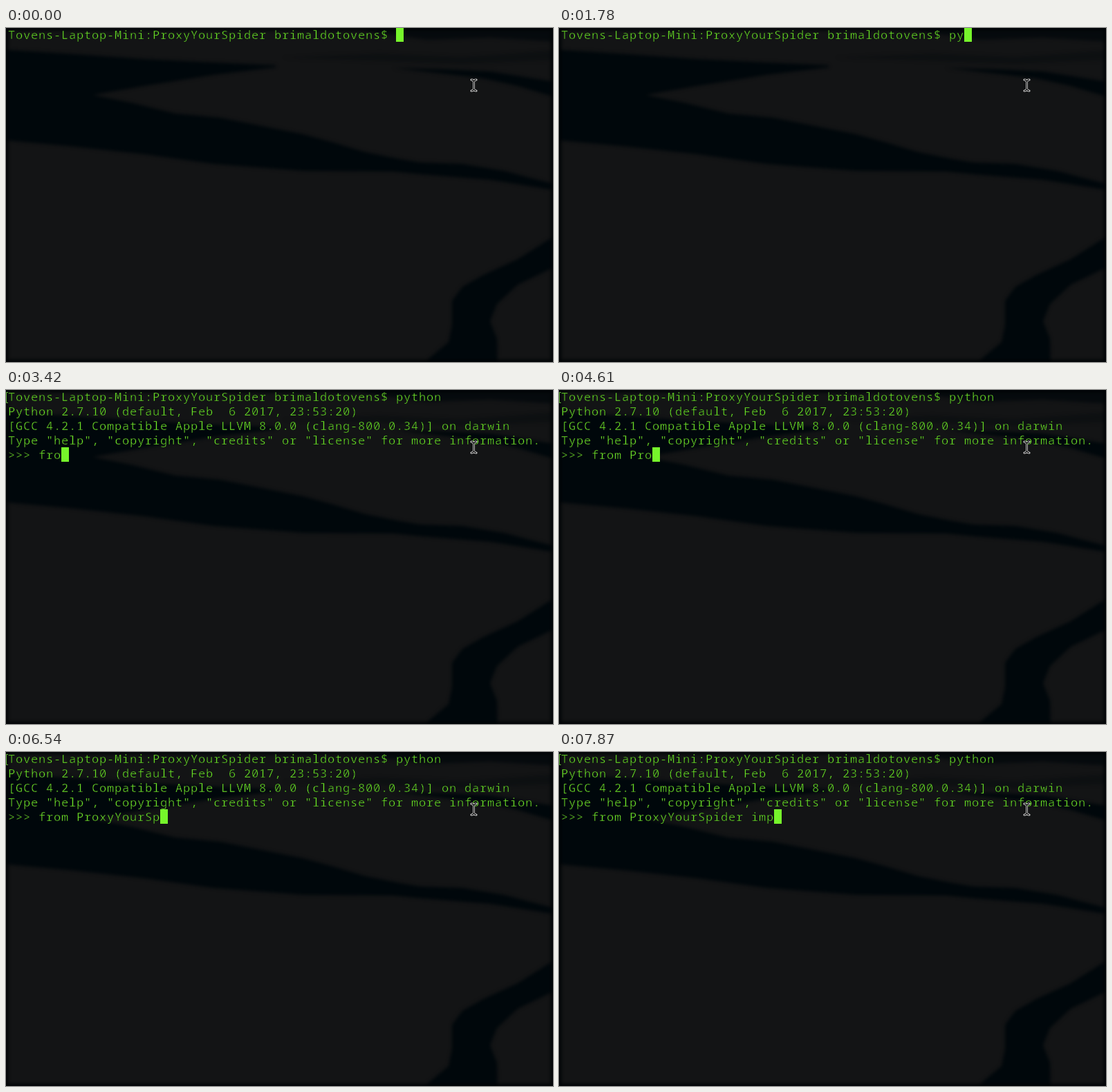
Write an HTML page that moves like this. It is 791 px wide and 484 px high and loops after 8000 ms.

```html
<!DOCTYPE html>
<html lang="en">
<head>
<meta charset="utf-8">
<title>Terminal session</title>
<style>
  html, body { margin: 0; width: 100%; height: 100%; overflow: hidden; background: #131415; }
  svg, pre, #cursor { position: absolute; }
  svg { left: 0; top: 0; }
  pre {
    left: 3px; top: -1px; margin: 0;
    font: 300 17px/21px "Noto Sans Mono", monospace;
    letter-spacing: .8px; /* 11px cells */
    font-variant-ligatures: none;
    color: #70ee27;
    -webkit-text-stroke: .45px #0d1012; /* thins the strokes */
  }
  #cursor { width: 11px; height: 21px; background: #76f52b; }
</style>
</head>
<body>
<svg width="791" height="484">
  <defs>
    <filter id="soft" x="-10%" y="-10%" width="120%" height="120%" color-interpolation-filters="sRGB">
      <feGaussianBlur stdDeviation="2.5"/>
    </filter>
  </defs>
  <g filter="url(#soft)" fill="#00070b">
    <path d="M-9 31L100 38 200 45 300 50 390 54 390 57 300 68 200 84 125 97 180 108 245 124 310 130 430 154 470 165 520 180 570 190 600 195 660 197 720 207 800 228V236L700 220 600 212 560 208 430 207 300 197 200 183 100 172-9 162Z"/>
    <path d="M560 58L640 60 700 63 800 79V102L740 84 690 73 630 66Z"/>
    <path d="M800 297L740 335 690 358 660 375 645 395 645 430 640 455 598 490H711L710 450 700 425 710 400 740 372 800 343Z"/>
    <path d="M470-5H800V20L700 14 610 17 540 8Z" opacity=".7"/>
    <path d="M400 43L540 37 660 42 800 32V46L660 52 520 47Z" opacity=".3"/>
    <path d="M0 0H791V484H0Z" fill="none" stroke="#000305" stroke-width="6"/>
  </g>
</svg>
<pre id="screen"></pre>
<div id="cursor"></div>
<svg width="791" height="484" fill="none">
  <path id="mark" d="M3 3.5H.5V18.5H3" stroke="#62b53a"/>
  <defs>
    <path id="beam" d="M673 75q3 0 3.5 3q.5-3 3.5-3M676.5 78V88M673 91q3 0 3.5-3q.5 3 3.5 3"/>
  </defs>
  <use href="#beam" stroke="#d5d5d5" stroke-width="3" stroke-linecap="round"/>
  <use href="#beam" stroke="#111" stroke-width="1.3"/>
</svg>
<script>
const LOOP = 8000, CELL = 11, ROW = 21;
const START = 2530, READY = 2680;

const prompt = "Tovens-Laptop-Mini:ProxyYourSpider brimaldotovens$ ";
const banner = [
  "Python 2.7.10 (default, Feb  6 2017, 23:53:20)",
  "[GCC 4.2.1 Compatible Apple LLVM 8.0.0 (clang-800.0.34)] on darwin",
  'Type "help", "copyright", "credits" or "license" for more information.',
  ">>> "
].join("\n");

// Each entry is a time in ms and the characters typed then.
const command = [[1490, "p"], [1780, "y"], [1930, "t"], [2080, "ho"], [2230, "n"]];
const statement = [
  [3130, "f"], [3280, "r"], [3420, "o"], [3570, "m"], [3720, " "],
  [4010, "P"], [4460, "r"], [4610, "o"], [4750, "x"], [4900, "y"],
  [5200, "Y"], [5500, "o"], [5790, "ur"],
  [6240, "S"], [6540, "p"], [6690, "i"], [6840, "d"], [6980, "e"], [7130, "r"],
  [7280, " "], [7430, "i"], [7730, "m"], [7870, "p"]
];

const [screenEl, cursorEl, markEl] =
  ["screen", "cursor", "mark"].map(id => document.getElementById(id));

const typed = (keys, t) => keys.filter(([at]) => t >= at).map(([, text]) => text).join("");
const cursorHidden = t => (t >= 300 && t < 890) || (t >= 1340 && t < 1490);

function textAt(t) {
  let text = prompt + typed(command, t);
  if (t >= START) text += "\n";
  if (t >= READY) text += banner + typed(statement, t);
  return text;
}

function draw(t) {
  const text = textAt(t);
  const lines = text.split("\n");
  if (screenEl.textContent !== text) screenEl.textContent = text;
  cursorEl.style.left = 3 + lines.at(-1).length * CELL + "px";
  cursorEl.style.top = (lines.length - 1) * ROW - 1 + "px";
  cursorEl.style.visibility = cursorHidden(t) ? "hidden" : "visible";
  markEl.style.visibility = t >= START ? "visible" : "hidden";
}

const began = performance.now();
function tick() {
  draw((performance.now() - began) % LOOP);
  requestAnimationFrame(tick);
}
tick();
</script>
</body>
</html>
```
